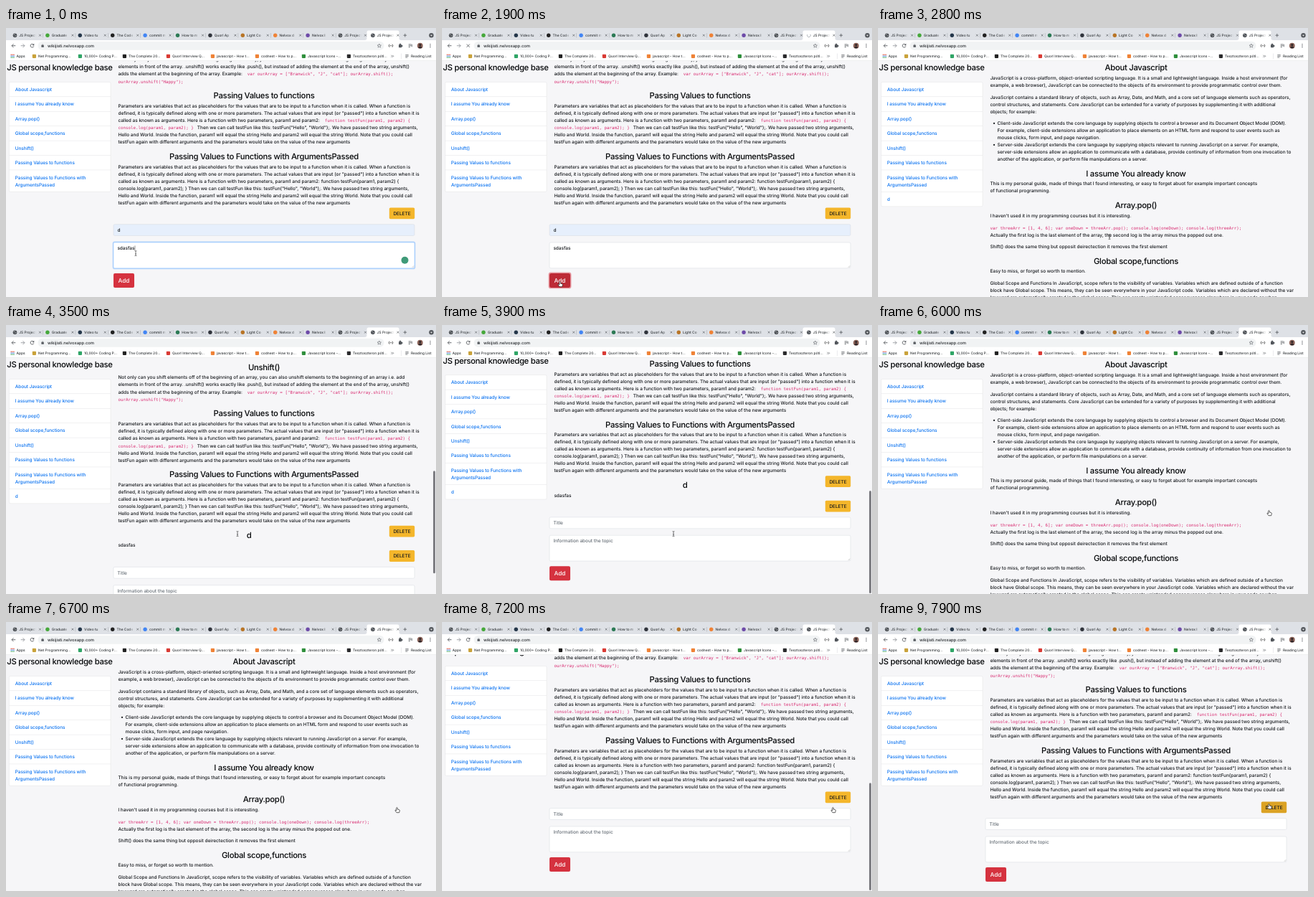
An HTML page with a canvas for the animation above (8000 ms loop, 600 by 375 pixels).

```html
<!DOCTYPE html>
<html lang="en">
<head>
<meta charset="utf-8">
<title>JS personal knowledge base</title>
<style>
html, body { margin: 0; width: 100%; height: 100%; overflow: hidden; background: #f6f6f8; }
canvas { display: block; width: 600px; height: 375px; }
</style>
</head>
<body>
<canvas id="stage"></canvas>
<script>
const W = 600, H = 375, LOOP = 8000, STEP = 100;
const TOP = 46, VIEW = H - TOP;
const BOTTOM = 393.3, EXTRA = 34.4;      // largest scroll, height of the added topic
const ADDED = 2000, REMOVED = 5600;      // page reloads

const canvas = document.getElementById('stage');
const dpr = window.devicePixelRatio || 1;
canvas.width = W * dpr;
canvas.height = H * dpr;
const g = canvas.getContext('2d');
g.textRendering = 'geometricPrecision';

const INK = '#15181c', BLACK = '#06080a', LINK = '#0a72f0', PINK = '#d82a70', GREY = '#53575c', LABEL = '#303437';
const SANS = 'Inter, "Open Sans", sans-serif';

// A font with one tracking value, taken from its mean advance.
function face(css, sample, advance) {
  g.font = css;
  g.letterSpacing = '0px';
  const gap = sample ? advance - g.measureText(sample).width / sample.length : 0;
  return { css, gap: gap.toFixed(4) + 'px' };
}
const body = face('500 6.47px ' + SANS, 'Parameters are variables that act as placeholders for the values that are to be input to a function when it is called. When a function is', 2.976);
const head = face('500 11.3px ' + SANS, 'Passing Values to Functions with ArgumentsPassed', 5.5);
const link = face('500 6.47px ' + SANS, 'Passing Values to functions', 3.074);
const code = face('5.833px "DejaVu Sans Mono", monospace');
const small = face('500 4.9px ' + SANS);
const address = face('500 5.833px ' + SANS);
const large = face('500 8.2px ' + SANS);

const article = [
  '#About Javascript',
  'JavaScript is a cross-platform, object-oriented scripting language. It is a small and lightweight language. Inside a host environment (for',
  'example, a web browser), JavaScript can be connected to the objects of its environment to provide programmatic control over them.',
  '',
  'JavaScript contains a standard library of objects, such as Array, Date, and Math, and a core set of language elements such as operators,',
  'control structures, and statements. Core JavaScript can be extended for a variety of purposes by supplementing it with additional',
  'objects; for example:',
  '',
  '*Client-side JavaScript extends the core language by supplying objects to control a browser and its Document Object Model (DOM).',
  '-For example, client-side extensions allow an application to place elements on an HTML form and respond to user events such as',
  '-mouse clicks, form input, and page navigation.',
  '*Server-side JavaScript extends the core language by supplying objects relevant to running JavaScript on a server. For example,',
  '-server-side extensions allow an application to communicate with a database, provide continuity of information from one invocation to',
  '-another of the application, or perform file manipulations on a server.',
  '#I assume You already know',
  'This is my personal guide, made of things that I found interesting, or easy to forget abuot for example important concepts',
  'of functional programming.',
  '#Array.pop()',
  "I haven't used it in my programming courses but it is interesting.",
  '',
  '|var threeArr = [1, 4, 6]; var oneDown = threeArr.pop(); console.log(oneDown); console.log(threeArr);',
  'Actually the first log is the last element of the array, the second log is the array minus the popped out one.',
  '',
  'Shift() does the same thing but opposit deirectection it removes the first element',
  '#Global scope,functions',
  'Easy to miss, or forget so worth to mention.',
  '',
  'Global Scope and Functions In JavaScript, scope refers to the visibility of variables. Variables which are defined outside of a function',
  'block have Global scope. This means, they can be seen everywhere in your JavaScript code. Variables which are declared without the var',
  'keyword are automatically created in the global scope. This can create unintended consequences elsewhere in your code or when',
  'running a function again. You should always declare your variables with var.',
  '',
  '|var myGlobal = 10; function fun1() { oopsGlobal = 5; }',
  '#Unshift()',
  'Not only can you shift elements off of the beginning of an array, you can also unshift elements to the beginning of an array i.e. add',
  'elements in front of the array. .unshift() works exactly like .push(), but instead of adding the element at the end of the array, unshift()',
  'adds the element at the beginning of the array. Example:    |var ourArray = ["Branwick", "J", "cat"]; ourArray.shift();',
  '|ourArray.unshift("Happy");'
];
const params = mark => [
  'Parameters are variables that act as placeholders for the values that are to be input to a function when it is called. When a function is',
  'defined, it is typically defined along with one or more parameters. The actual values that are input (or "passed") into a function when it is',
  `called as known as arguments. Here is a function with two parameters, param1 and param2: ${mark && '   ' + mark}function testFun(param1, param2) {`,
  `${mark}console.log(param1, param2); }${mark && mark + '  '} Then we can call testFun like this: testFun("Hello", "World");. We have passed two string arguments,`,
  'Hello and World. Inside the function, param1 will equal the string Hello and param2 will equal the string World. Note that you could call',
  'testFun again with different arguments and the parameters would take on the value of the new arguments'
];
article.push('#Passing Values to functions', ...params('|'),
  '#Passing Values to Functions with ArgumentsPassed', ...params(''));

const topics = ['About Javascript', 'I assume You already know', 'Array.pop()', 'Global scope,functions',
  'Unshift()', 'Passing Values to functions', 'Passing Values to Functions with\nArgumentsPassed'];

const tabs = [['JS Project', 0], ['Graduate', '#45a83a'], ['Video tu', '#24364a'], ['The Code', '#222'],
  ['commit m', '#4285f4'], ['How to m', '#2c7a55'], ['Quorl Ap', '#30343c'], ['Light Co', '#b87425'],
  ['Nelvox d', '#ef8236'], ['Nelvox l', '#6d4aa8'], ['JS Project', 0], ['JS Project', 0]];

const marks = [[45, 'Net Programming...', '#c9a23a'], [109, '10,000+ Coding P...', '#2fa566'],
  [171, 'The Complete 20...', '#222'], [232, 'Quorl Interview Q...', '#d93a34'],
  [294, 'javascript - How t...', '#ef8236'], [356, 'codnest - How to p...', '#ef8236'],
  [421, 'Javascript Icons -...', '#2f8f3c'], [484, 'Tesztoszteron pótl...', '#2a2a2c']];

// Keyframes: time first, then values.
const scrollKeys = [[2800, 0], [3000, 85], [3250, 235], [3500, 364], [3650, 430], [3750, BOTTOM + EXTRA + 11],
  [3950, BOTTOM + EXTRA + 4], [4200, BOTTOM + EXTRA], [5599, BOTTOM + EXTRA], [5600, 0],
  [6750, 0], [6900, 150], [7050, 330], [7200, BOTTOM + 14], [7400, BOTTOM + 5], [7600, BOTTOM]];
const mouseKeys = [[0, 181, 314], [200, 181, 315], [700, 165, 357], [2100, 165, 357], [2700, 323, 291],
  [4200, 323, 291], [4900, 546, 262], [7250, 546, 262], [7600, 546, 257]];

function at(keys, t) {
  if (t <= keys[0][0]) return keys[0].slice(1);
  for (let i = 1; i < keys.length; i++) {
    const a = keys[i - 1], b = keys[i];
    if (t <= b[0]) {
      const k = (t - a[0]) / (b[0] - a[0]);
      return a.slice(1).map((v, j) => v + (b[j + 1] - v) * k);
    }
  }
  return keys[keys.length - 1].slice(1);
}

function text(s, x, y, f, color = INK, align = 'left') {
  g.font = f.css;
  g.letterSpacing = f.gap;
  g.fillStyle = color;
  g.textAlign = align;
  g.fillText(s, x, y);
  return g.measureText(s).width;
}
function rich(s, x, y) {
  s.split('|').forEach((part, i) => {
    if (part) x += text(part, x, y, i % 2 ? code : body, i % 2 ? PINK : INK);
  });
}
function box(x, y, w, h, r, fill, stroke, lw = 0.42) {
  g.beginPath();
  g.roundRect(x, y, w, h, r);
  if (fill) { g.fillStyle = fill; g.fill(); }
  if (stroke) { g.strokeStyle = stroke; g.lineWidth = lw; g.stroke(); }
}
function disc(x, y, r, fill) {
  g.beginPath();
  g.arc(x, y, r, 0, 7);
  g.fillStyle = fill;
  g.fill();
}
function ring(x, y, r, a, b, color, lw = 0.8) {
  g.beginPath();
  g.arc(x, y, r, a, b);
  g.strokeStyle = color;
  g.lineWidth = lw;
  g.stroke();
}
function path(d, x, y, stroke, lw, fill) {
  g.save();
  g.translate(x, y);
  const p = new Path2D(d);
  if (fill) { g.fillStyle = fill; g.fill(p); }
  g.strokeStyle = stroke;
  g.lineWidth = lw;
  g.lineJoin = 'round';
  g.stroke(p);
  g.restore();
}
const cross = (x, y, r, lw = 0.65) => path(`M${-r} ${-r}L${r} ${r}M${r} ${-r}L${-r} ${r}`, x, y, GREY, lw);

function globe(x, y) {
  disc(x, y, 2.8, '#45494e');
  path('M-1.9 -.8Q-.4 -.2 .2 -1.9M-.6 1.9Q.3 .3 2 .2', x, y, '#e4e6ea', 0.6);
}

function drawTabs(t, loading) {
  g.fillStyle = '#dee1e6';
  g.fillRect(0, 0, W, 18);
  path('M501 17Q503.5 17 503.5 14L503.5 6Q503.5 3.4 506 3.4L546 3.4Q548.5 3.4 548.5 6L548.5 14Q548.5 17 551 17Z', 0, 0, '#fff', 0.1, '#fff');
  tabs.forEach(([name, color], i) => {
    const x = 12.5 + i * 45.4, last = i === 11;
    if (last && loading) {
      const a = t / 1000 * 6.3;
      ring(x, 10.2, 2.4, a, a + 4.2, '#9aa0a6');
    } else if (color) disc(x, 10.2, 2.7, color);
    else globe(x, 10.2);
    g.save();
    g.beginPath();
    g.rect(x + 5, 4, 24.5, 12);
    g.clip();
    const fade = g.createLinearGradient(x + 23, 0, x + 29.5, 0);
    fade.addColorStop(0, LABEL);
    fade.addColorStop(1, 'rgba(48,52,55,0)');
    text(name, x + 5.8, 12, small, fade);
    g.restore();
    cross(x + 35, 10.2, 1.4);
    if (i < 10) { g.fillStyle = '#9a9ea5'; g.fillRect(x + 38.8, 7, 0.4, 6.5); }
  });
  path('M-2.3 0L2.3 0M0 -2.3L0 2.3', 556.8, 10.2, GREY, 0.8);
  disc(593.5, 10.2, 3.2, GREY);
  path('M-1.3 -.5L1.3 -.5L0 1.2Z', 593.5, 10.2, '#fff', 0.1, '#fff');
}

function drawToolbar(loading) {
  g.fillStyle = '#fff';
  g.fillRect(0, 17, W, TOP - 17);
  path('M2.8 0L-2.5 0M0 -2.5L-2.5 0L0 2.5', 10.5, 24.7, GREY, 0.85);
  path('M-2.8 0L2.5 0M0 -2.5L2.5 0L0 2.5', 23.5, 24.7, '#8f9398', 0.85);
  if (loading) cross(36.5, 24.7, 2.1, 0.85);
  else {
    ring(36.5, 24.7, 2.4, 0.3, 5.4, GREY, 0.85);
    path('M2.7 -2.9L2.7 -.4L.2 -.4Z', 36.5, 24.7, GREY, 0.1, GREY);
  }
  box(44.5, 18.7, 483, 12, 6, '#f1f3f4');
  box(49.4, 24, 3.4, 2.8, 0.4, GREY);
  ring(51.1, 24, 1.1, Math.PI, 0, GREY, 0.6);
  text('wikijisti.nelvoxapp.com', 58, 26.7, address, '#25282c');
  path('M0 -2.7L.8 -.8L2.7 -.7L1.2 .5L1.7 2.4L0 1.3L-1.7 2.4L-1.2 .5L-2.7 -.7L-.8 -.8Z', 520.8, 24.7, GREY, 0.55);
  ring(537, 24.7, 2.8, 2.3, 4, '#444');
  ring(537, 24.7, 2.8, -0.85, 0.85, '#444');
  disc(536.2, 24.7, 0.6, '#444');
  disc(538, 24.7, 0.6, '#444');
  box(548, 23, 4.2, 4.2, 0.6, GREY);
  disc(550, 22.6, 1, GREY);
  disc(552.6, 25, 1, GREY);
  path('M-2.6 -1.8L1.2 -1.8M-2.6 0L1.2 0M-2.6 1.8L-.4 1.8M2 -2L2 1.6', 564.3, 24.7, GREY, 0.8);
  disc(577.8, 24.7, 3.9, '#8a6258');
  disc(577.8, 23.6, 1.5, '#2d2527');
  path('M-2.6 2.4Q0 -1.4 2.6 2.4Q0 4.6 -2.6 2.4Z', 577.8, 24.9, '#2d2527', 0.1, '#2d2527');
  [-2, 0, 2].forEach(d => disc(592, 24.7 + d, 0.65, GREY));

  ['#e0523f', '#4b89e8', '#3fa45b'].forEach((c, i) => {
    for (let j = 0; j < 3; j++) { g.fillStyle = c; g.fillRect(6.6 + j * 1.9, 36.6 + i * 1.9, 1.3, 1.3); }
  });
  text('Apps', 14.5, 41.2, small, LABEL);
  marks.forEach(([x, name, color]) => {
    box(x - 8.2, 36.7, 5.2, 5.2, 0.8, color);
    text(name, x, 41.2, small, LABEL);
  });
  path('M-1.6 -1.5L-.1 0L-1.6 1.5M.3 -1.5L1.8 0L.3 1.5', 539, 39.3, GREY, 0.65);
  g.fillStyle = '#d4d7db';
  g.fillRect(551.5, 35.5, 0.5, 7.5);
  path('M-2.2 -1.7L2.2 -1.7M-2.2 0L2.2 0M-2.2 1.7L.8 1.7', 559.5, 39.3, GREY, 0.75);
  text('Reading List', 565, 41.2, small, LABEL);
  g.fillStyle = '#dcdee1';
  g.fillRect(0, TOP - 0.5, W, 0.5);
}

function drawSidebar(extra, shift) {
  text('JS personal knowledge base', 1.3, 59.4 - shift, head, BLACK);
  const list = extra ? [...topics, 'd'] : topics;
  let y = 75.4 - shift;
  const height = 6 * 20.42 + 30.42 + (extra ? 20.42 : 0);
  box(4.4, y, 141.6, height, 1.7, '#fff', '#dddde0');
  list.forEach((name, i) => {
    if (i) { g.fillStyle = '#dddde0'; g.fillRect(4.4, y - 0.2, 141.6, 0.42); }
    const rows = name.split('\n');
    rows.forEach((row, j) => text(row, 12.8, y + 12.6 + j * 10, link, LINK));
    y += 10.42 + rows.length * 10;
  });
}

function deleteButton(y, hover) {
  box(534.8, y - 7.9, 35.4, 15.8, 1.7, hover ? '#dba224' : '#f4b62b');
  text('DELETE', 552.5, y + 2.4, body, INK, 'center');
}

function drawArticle(scroll) {
  let y = 59.2 - scroll, before = '';
  article.forEach((s, i) => {
    const kind = s[0];
    if (s === '') { y += 6.667; return; }
    if (i) y += kind === '#' ? 21.5 : before === '#' ? 12.7 : 10;
    if (s.includes('|')) y += 0.3;       // code makes its line box taller
    before = kind;
    if (y < 35 || y > 390) return;
    if (kind === '#') text(s.slice(1), 360, y, head, BLACK, 'center');
    else if (kind === '*' || kind === '-') {
      if (kind === '*') disc(162, y - 2.3, 1.1, INK);
      text(s.slice(1), 166.6, y, body);
    } else rich(s, 156.4, y);
  });
}

function field(y, h, value, hint, fill, focus) {
  if (focus) box(149.5, y - 0.6, 421, h + 1.2, 2, null, 'rgba(60,150,255,.35)', 1.6);
  box(150, y, 420, h, 1.7, fill, focus ? '#80bdff' : '#ced4da');
  const w = text(value || hint, 155.4, y + 10.2, body, value ? INK : '#666e76');
  if (focus) { g.fillStyle = '#111'; g.fillRect(155.7 + w, y + 4.4, 0.45, 7); }
}

function drawForm(t, y) {
  const filled = t < ADDED, focus = t < 800;
  field(y + 15.4, 15.8, filled && 'd', 'Title', filled ? '#e6effc' : '#fff', false);
  field(y + 40.7, 35.8, filled && 'sdasfas', 'Information about the topic', '#fff', focus);
  path('M0 -2.6L-2.6 0M0 -1.2L-1.2 0', 569.2, y + 75.6, '#888', 0.35);
  if (focus) disc(556.5, y + 65.4, 5, '#3f9a78');
  const over = t >= 600 && filled;
  if (filled && !focus) box(149.3, y + 82.9, 30.4, 21.4, 2.6, null, 'rgba(216,60,75,.5)', 1.5);
  box(150, y + 83.6, 29, 20, 2, over ? '#bd2a36' : '#d5323f');
  text('Add', 164.5, y + 96.6, large, '#fff', 'center');
}

function drawPage(t) {
  const extra = t >= ADDED && t < REMOVED;
  const scroll = t < ADDED ? BOTTOM : at(scrollKeys, t)[0];
  const max = BOTTOM + (extra ? EXTRA : 0);
  g.fillStyle = '#f6f6f8';
  g.fillRect(0, 0, W, H);
  drawSidebar(extra, Math.max(0, scroll - max));
  drawArticle(scroll);

  let y = BOTTOM + 258.3 - scroll;
  deleteButton(y, t >= 7400);
  if (extra) {
    text('d', 339, y + 9, head, BLACK, 'center');
    text('sdasfas', 156.4, y + 21.8, body);
    y += EXTRA;
    deleteButton(y, t >= 4800);
  }
  drawForm(t, y);

  const shown = (t >= 2850 && t < 4600) || t >= 6800;
  const fade = extra ? (4600 - t) / 300 : (7900 - t) / 200;
  if (shown && fade > 0) {
    const doc = max + VIEW, len = VIEW * VIEW / doc;
    g.globalAlpha = Math.min(1, fade);
    box(596, Math.min(TOP - 1 + scroll / doc * VIEW, H - len - 1), 3, len, 1.5, '#7d7d82');
    g.globalAlpha = 1;
  }
}

function drawMouse(t) {
  const [x, y] = at(mouseKeys, t);
  if (t < 600 || (t >= 2700 && t < 4700)) {
    path('M-1.4 -3.4Q0 -3.4 0 -2.6Q0 -3.4 1.4 -3.4M0 -2.6L0 2.8M-1.4 3.6Q0 3.6 0 2.8Q0 3.6 1.4 3.6M-.8 .9L.8 .9', x, y, '#222', 0.6);
  } else if (t >= 2200 && t < 2700) {
    path('M0 -3.5L0 3.4L1.6 1.9L2.7 4.4L3.8 3.9L2.7 1.5L4.8 1.4Z', x, y, '#fff', 0.6, '#111');
  } else {
    path('M-1.3 -3Q-.5 -4.2 .2 -3L.5 -.8L2.7 -.3Q3.5 0 3.3 1L2.7 3.7L-1 3.7L-3 1Q-3.2 -.1 -2.2 .1L-1.1 .9Z', x, y, '#111', 0.65, '#fff');
  }
}

function draw(time) {
  const t = Math.floor(time % LOOP / STEP) * STEP;
  const loading = (t >= 900 && t < ADDED) || (t >= 5300 && t < REMOVED);
  g.setTransform(dpr, 0, 0, dpr, 0, 0);
  drawPage(t);
  drawTabs(t, loading);
  drawToolbar(loading);
  drawMouse(t);
}

const start = performance.now();
function tick() {
  draw(performance.now() - start);
  requestAnimationFrame(tick);
}
tick();
</script>
</body>
</html>
```
